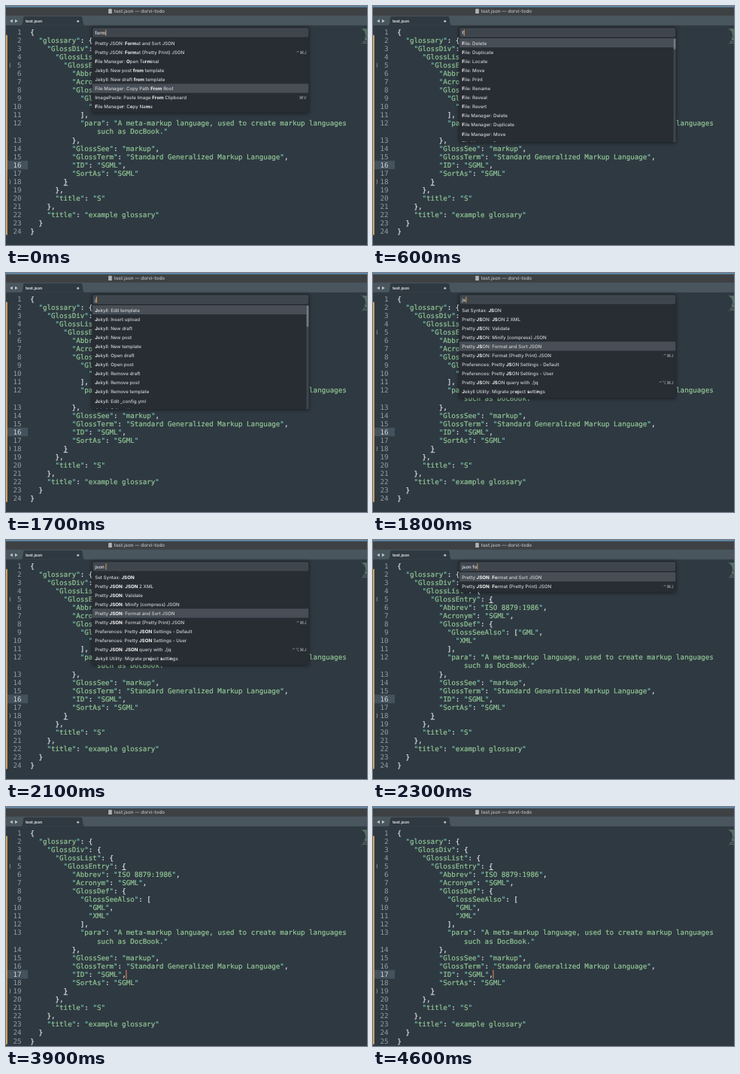
An HTML page that plays this animation: 480x318 px, repeating every 5900 ms.

```html
<!DOCTYPE html>
<html lang="en">
<head>
<meta charset="utf-8">
<title>Command palette</title>
<style>
  html, body { margin: 0; width: 100%; height: 100%; overflow: hidden; background: #2f3941; }
  svg { display: block; }
  #stage { width: 100%; height: 100%; }
  text { white-space: pre; text-rendering: geometricPrecision; }
  .ui { font-family: Inter, "DejaVu Sans", sans-serif; font-size: 6.2px; font-weight: 500; fill: #ced2d5; }
  .ui .hit { font-weight: 700; fill: #fafafa; }
  .key { fill: #9aa1a8; text-anchor: end; font-size: 5.8px; }
  .code { font-family: "DejaVu Sans Mono", "Liberation Mono", monospace; font-size: 9.2px; fill: #dfe4ea; }
  .code text { stroke: currentColor; stroke-width: 0; }
  .code .line { stroke: #dfe4ea; stroke-width: .2; }
  .code .str { fill: #92c797; stroke: #92c797; }
  .code .quo { fill: #6dbfb5; stroke: #6dbfb5; }
  .num { fill: #939da4; text-anchor: end; }
  .num.on { fill: #d0d6db; }
  .panel { filter: drop-shadow(0 1px 2.5px rgba(0, 0, 0, .5)); }
</style>
</head>
<body>
<svg id="stage" viewBox="0 0 480 318" preserveAspectRatio="none">
  <rect width="480" height="318" fill="#2f3941"/>
  <g id="editors"></g>
  <g id="minimap" opacity=".65"></g>
  <rect width="480" height="13" fill="#3e4143"/>
  <rect width="480" height="1.7" fill="#5f89aa"/>
  <rect y="12.7" width="480" height="13.1" fill="#4a565e"/>
  <path d="M19.500 25.800Q21.500 25.500 22 23L23 15.500Q23.300 13.800 25 13.800H99.500Q101.200 13.800 101.500 15.500L102.500 23Q103 25.500 105 25.800Z" fill="#2f3941"/>
  <path d="M8.800 17.800V22.200L5.200 20ZM12 17.800V22.200L15.600 20Z" fill="#c3c9cd"/>
  <circle cx="95.700" cy="20.300" r="1.500" fill="#b4bbc0"/>
  <rect x="136.200" y="3.800" width="4.600" height="6.200" rx=".6" fill="#b0b3b5"/>
  <g class="ui">
    <text x="143.800" y="9.300" style="font-size:6.300px" fill="#bfc2c5">test.json — dorvi-todo</text>
    <text x="26" y="22.100" style="font-size:5.300px;font-weight:600" fill="#f2f3f4">test.json</text>
  </g>
  <g id="panels"></g>
</svg>
<script>
const LOOP = 5900, CHAR = 5.54, LEFT = 32.3, STEP = 11.08, ROW = 12.1;
const $ = id => document.getElementById(id);

const head = `{
  "glossary": {
    "GlossDiv": {
      "GlossList": {
        "GlossEntry": {
          "Abbrev": "ISO 8879:1986",
          "Acronym": "SGML",
          "GlossDef": {
            "GlossSeeAlso": [`;
const tail = `
              "XML"
            ],
            "para": "A meta-markup language, used to create markup languages
~               such as DocBook."
          },
          "GlossSee": "markup",
          "GlossTerm": "Standard Generalized Markup Language",
          "ID": "SGML",
          "SortAs": "SGML"
        }
      },
      "title": "S"
    },
    "title": "example glossary"
  }
}`;
const docs = [head + '"GML",' + tail, head + '\n              "GML",' + tail];

const rect = (x, y, w, h, fill) =>
  `<rect x="${x}" y="${y}" width="${w}" height="${h}" fill="${fill}"/>`;

// Colours one line; the string state carries over wrapped lines.
function paint(line, inside) {
  const html = line.split('"').map((part, i) => {
    if (i) inside = !inside;
    const body = inside ? `<tspan class="str">${part}</tspan>` : part;
    return (i ? '<tspan class="quo">"</tspan>' : '') + body;
  }).join('');
  return [html, inside];
}

function editor(doc, caret) {
  const lines = doc.split('\n');
  let out = '', back = '', num = 0, inside = false, html;
  lines.forEach((raw, i) => {
    const wrapped = raw[0] === '~';
    const line = wrapped ? raw.replace('~', ' ') : raw;
    const base = 37.5 + STEP * i, top = base - 9;
    const indent = line.search(/\S/), x = LEFT + indent * CHAR;
    [html, inside] = paint(line.trim(), inside);
    const active = line.includes('"ID"');
    if (active) {
      back += rect(0, top, 29, STEP + .4, '#43525d');
      if (caret) out += rect(x + 13 * CHAR - .3, top, 1, STEP + .6, '#f08a58');
    }
    if (!wrapped) out += `<text class="num${active ? ' on' : ''}" x="20.500" y="${base}">${++num}</text>`;
    out += `<text class="line" x="${x}" y="${base}">${html}</text>`;
    const opens = line.includes('"GlossEntry"'), closes = line === '        }';
    if (opens || closes) {
      const bx = opens ? x + 14 * CHAR : x;
      out += rect(bx, base + 1.3, CHAR, .9, '#d5dbe1');
      out += `<text x="3.200" y="${base - .8}" style="font-size:7px" fill="#9fb3ba">${opens ? '(' : ')'}</text>`;
    }
  });
  back += rect(0, 38.7, 1.8, STEP * (lines.length - 1), '#dda960');
  return `<g class="code">${back}${out}</g>`;
}

const each = (prefix, names) => names.split(',').map(n => prefix + n);
const sortRow = 'Pretty *JSON*: Format and Sort JSON';
const printRow = 'Pretty *JSON*: Format (Pretty Print) JSON|⌃⌘J';
const minify = 'Pretty *JSON*: Minify (compress) JSON';
const prefs = 'Preferences: Pretty *JSON* Settings - ';

const formList = [
  'Pretty JSON: *Form*at and Sort JSON',
  'Pretty JSON: *Form*at (Pretty Print) JSON|⌃⌘J',
  '*F*ile Manager: *O*pen Te*rm*inal',
  'Jekyll: New post *from* template',
  'Jekyll: New draft *from* template',
  'File Manager: Copy Path *From* Root',
  'ImagePaste: Paste Image *From* Clipboard|⌘V',
  '*F*ile Manage*r*: C*o*py Na*m*e'];
const fileList = [
  ...each('*F*ile: ', 'Delete,Duplicate,Locate,Move,Print,Rename,Reveal,Revert'),
  ...each('*F*ile Manager: ', 'Delete,Duplicate,Move,Rename')];
const jekyllList = each('*J*ekyll: ', 'Edit template,Insert upload,New draft,New post,New template,' +
  'Open draft,Open post,Remove draft,Remove post,Remove template,Edit _config.yml,Edit settings');
const jsonList = [
  'Set Syntax: *JSON*', 'Pretty *JSON*: *JSON* 2 XML', 'Pretty *JSON*: Validate',
  minify, sortRow, printRow, prefs + 'Default', prefs + 'User',
  'Pretty *JSON*: *JSON* query with ./jq|⌃⌥⌘J',
  '*J*ekyll Utility: Migrate pr*oj*ect *s*etti*n*gs'];

const plain = list => list.map(s => s.replace(/\*/g, ''));
const short = list => list.map(s => s.replace(/\*JSON\*/g, '*JS*ON'));
const narrowed = n => [sortRow, printRow].map(s =>
  s.replace('Format', `*${'Form'.slice(0, n)}*${'Format'.slice(n)}`));

// start time, query, rows, selected row, scrollbar thumb height
const scenes = [
  [0, 'form', formList, 5],
  [600, 'f', fileList, 0, 14],
  [1100, '', plain(fileList), 0, 14],
  [1600, 'j', jekyllList, 0, 28],
  [1800, 'js', short(jsonList), 4],
  [1900, 'json', jsonList, 4],
  [2100, 'json ', jsonList, 4],
  [2200, 'json f', [...narrowed(1), minify.replace('Minify', 'Mini*f*y'), prefs + 'De*f*ault'], 0],
  [2300, 'json fo', narrowed(2), 0],
  [2400, 'json for', narrowed(3), 0],
  [2600, 'json form', narrowed(4), 0],
  [3900]];

const marked = s => s.replace(/\*(.+?)\*/g, '<tspan class="hit">$1</tspan>');

function panel([, query, rows, chosen, thumb]) {
  if (!rows) return '<g></g>';
  const height = thumb ? 138 : rows.length * ROW + 2;
  const list = rows.map((row, i) => {
    const [label, key] = row.split('|'), y = i * ROW;
    return (i === chosen ? rect(0, y, 288, ROW, '#474e56') : '') +
      `<text x="3.700" y="${y + 8.5}">${marked(label)}</text>` +
      (key ? `<text class="key" x="285" y="${y + 8.4}">${key}</text>` : '');
  }).join('');
  const bar = thumb ? rect(399.5, 43, 3, height, '#3f464d') + rect(399.7, 43.5, 2.6, thumb, '#747b82') : '';
  return `<g class="ui"><g class="panel">${rect(114.5, 28, 288, height + 15, '#282d33')}</g>
    <rect x="116" y="30" width="285.500" height="10.800" rx="1" fill="#3e454c" stroke="#50575e" stroke-width=".6"/>
    <text class="query" x="118.300" y="37.600" fill="#eceeef">${query}</text>
    <rect class="caret" x="118" y="31.500" width=".9" height="8" fill="#f0a550"/>
    <svg x="114.500" y="43" width="288" height="${height}">${list}</svg>
    ${bar}</g>`;
}

$('editors').innerHTML = docs.map((d, i) => editor(d, i === 1)).join('');
$('panels').innerHTML = scenes.map(panel).join('');
$('minimap').innerHTML = docs[1].split('\n').map((line, i) => {
  const x = 472.5 + Math.min(line.replace('~', ' ').search(/\S/), 12) * .45;
  return rect(x, 29.5 + i * .85, Math.min(480 - x, line.trim().length * .5), .7, '#7fae8c');
}).join('');

const editors = [...$('editors').children], panels = [...$('panels').children];

panels.forEach(p => {
  const q = p.querySelector('.query');
  if (q) p.querySelector('.caret').setAttribute('x', 118.5 + q.getComputedTextLength());
});

const show = (list, n) => list.forEach((el, i) => el.style.display = i === n ? '' : 'none');
let start, last = -1;
function draw(now) {
  start ??= now;
  const t = (now - start) % LOOP;
  const n = scenes.findLastIndex(s => s[0] <= t);
  if (n !== last) {
    show(panels, n);
    show(editors, t < 3900 ? 0 : 1);
    last = n;
  }
  requestAnimationFrame(draw);
}
draw(performance.now());
</script>
</body>
</html>
```
